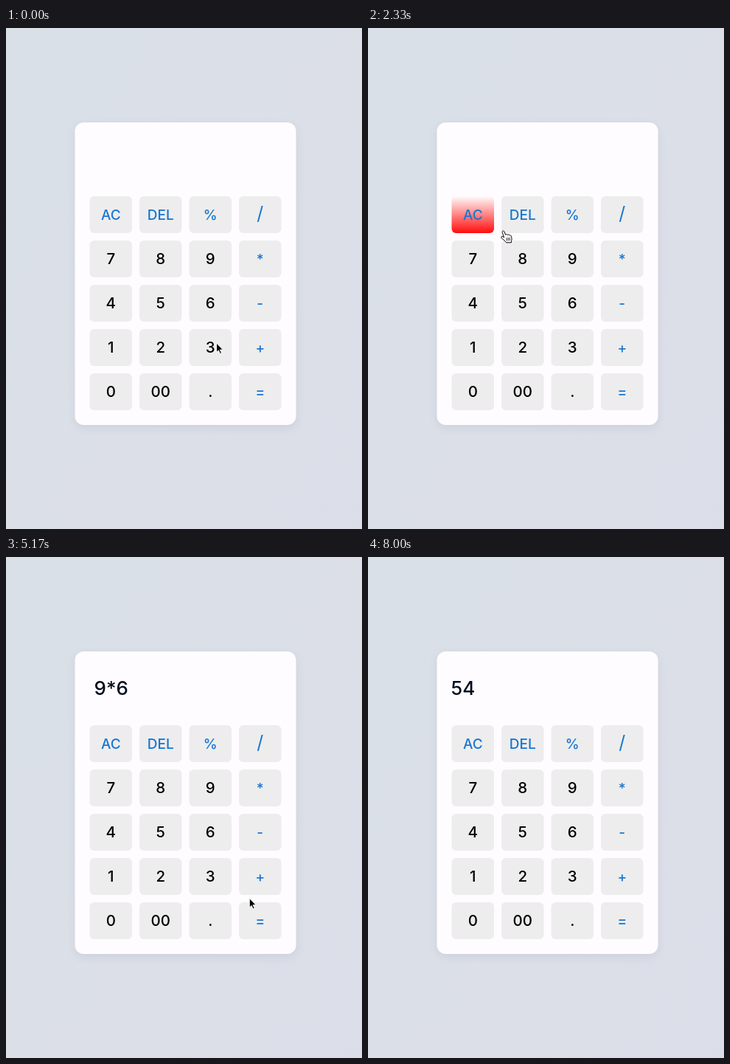
Recreate the animation shown at these times as an HTML page. Size 483x679 px, loop 8170 ms.

```html
<!DOCTYPE html>
<html lang="en">
<head>
<meta charset="utf-8">
<title>Calculator</title>
<style>
  html, body { margin: 0; width: 100%; height: 100%; overflow: hidden; }
  body { background: linear-gradient(120deg, #d9e0e7, #dcdfe8 60%, #dbdee8); }
  svg { display: block; width: 100%; height: 100%; }
  text { font: 500 20.5px Inter, "Open Sans", sans-serif; font-feature-settings: "calt" 0; fill: #000; }
  .key { text-anchor: middle; }
  .op { font-size: 19px; fill: #1976d2; }
  .tall { font-size: 25px; font-weight: 400; }
  #out { font-size: 26px; fill: #020c1c; }
  .card { fill: #fffcff; filter: drop-shadow(0 4px 6px rgba(20, 30, 50, .07)); }
</style>
</head>
<body>
<svg viewBox="0 0 483 679">
  <defs>
    <linearGradient id="glow" x1="0" y1="0" x2="0" y2="1">
      <stop offset="0" stop-color="#fffcfc"/>
      <stop offset="1" stop-color="#ff0c0c"/>
    </linearGradient>
  </defs>
  <rect class="card" x="93.5" y="128" width="300" height="410" rx="12"/>
  <text id="out" y="187"></text>
  <g id="plates"></g>
  <g id="labels"></g>
  <g id="cursor">
    <path id="arrow" d="M0 0V12.6L2.9 9.9 4.9 14.4 7 13.5 5 9.1H9Z" fill="#000" stroke="#fff" stroke-linejoin="round"/>
    <g id="hand" stroke="#000" stroke-linejoin="round" stroke-linecap="round">
      <path fill="#fff" d="M-1.6 1.6C-2.2-.4.4-1.2 1.2.8L2.8 5C3.6 4 5 4.2 5.5 5.2 6.4 4.4 7.8 4.7 8.2 5.8 9.4 5.2 10.4 5.9 10.7 7.2 11.4 9.6 11.6 11.4 10.8 13.4L10.6 15.6H4C2.6 13.4-.4 11.6-2.6 9.4-3.8 8-2 6.6-.6 7.6L.6 8.4Z"/>
      <path fill="none" stroke-width=".8" d="M4.2 9.5l.6 3.4M6.3 9.2l.5 3.5M8.4 9l.3 3.5"/>
    </g>
  </g>
</svg>
<script>
const LOOP = 8170, TICK = 500 / 3, LAST = 48, HIDE = 44;
const TRAVEL = 3; // longest move between two stops, in ticks
const KEY = { w: 57.5, h: 50, gap: 10, left: 113.5, top: 228 };
const LABELS = "AC DEL % / 7 8 9 * 4 5 6 - 1 2 3 + 0 00 . =".split(" ");

// pointer stops: arrival tick, x, y
const STOPS = [
  [0, 285.5, 427], [5, 281, 434], [10, 274, 258], [11, 216, 275], [13, 150, 262],
  [16, 280, 313], [18, 322, 312.5], [26, 291, 370], [32, 344, 495], [35, 352, 440],
  [36, 401, 390.5], [38, 434, 450], [40, 400, 522], [43, 201, 526]
];
const PRESSES = [[17, "9"], [21, "*"], [28, "6"], [33, "="]];

const $ = id => document.getElementById(id);

function add(parent, tag, attrs) {
  const el = document.createElementNS("http://www.w3.org/2000/svg", tag);
  for (const name in attrs) el.setAttribute(name, attrs[name]);
  return parent.appendChild(el);
}

const keys = LABELS.map((label, i) => {
  const x = KEY.left + (i % 4) * (KEY.w + KEY.gap);
  const y = KEY.top + (i >> 2) * (KEY.h + KEY.gap);
  const plate = add($("plates"), "rect", { x, y, width: KEY.w, height: KEY.h, rx: 6 });
  const kind = i < 4 || i % 4 === 3 ? " op" : "";
  const tall = label === "/" ? " tall" : "";
  add($("labels"), "text", { class: "key" + kind + tall, x: x + KEY.w / 2, y: y + 32.3 })
    .textContent = label;
  return { x, y, plate };
});

// wait at each stop, then ease over to the next one
function pointAt(tick) {
  const n = STOPS.findIndex(s => s[0] >= tick);
  if (n < 1) return STOPS.at(n).slice(1);
  const [from, ax, ay] = STOPS[n - 1], [to, bx, by] = STOPS[n];
  const span = Math.min(TRAVEL, to - from);
  const k = Math.max(0, 1 - (to - tick) / span);
  const e = k * k * (3 - 2 * k);
  return [ax + (bx - ax) * e, ay + (by - ay) * e];
}

const keyAt = ([px, py]) => keys.find(({ x, y }) =>
  px >= x && px <= x + KEY.w && py >= y && py <= y + KEY.h);

function display(tick) {
  const typed = PRESSES.filter(p => p[0] <= tick).map(p => p[1]).join("");
  const done = typed.endsWith("=");
  const [a, b] = typed.split("*");
  $("out").textContent = done ? a * parseInt(b) : typed;
  $("out").setAttribute("x", done ? 112.5 : 119.5);
}

const show = (id, on) => $(id).setAttribute("visibility", on ? "inherit" : "hidden");

function draw(tick) {
  const at = pointAt(tick);
  const over = tick > 0 && keyAt(at);
  // the highlight trails the pointer by one tick
  const lit = tick > 0 && keyAt(pointAt(tick - 1));

  for (const key of keys) {
    key.plate.setAttribute("fill", key === lit ? "url(#glow)" : "#ededed");
  }
  $("cursor").setAttribute("transform", `translate(${at})`);
  show("cursor", tick < HIDE);
  show("hand", over);
  show("arrow", !over);
  display(tick);
}

const start = performance.now();
let last = -1;
function loop() {
  const t = (performance.now() - start) % LOOP;
  const tick = Math.min(LAST, Math.floor((t + 5) / TICK));
  if (tick !== last) draw(last = tick);
  requestAnimationFrame(loop);
}
loop();
</script>
</body>
</html>
```
